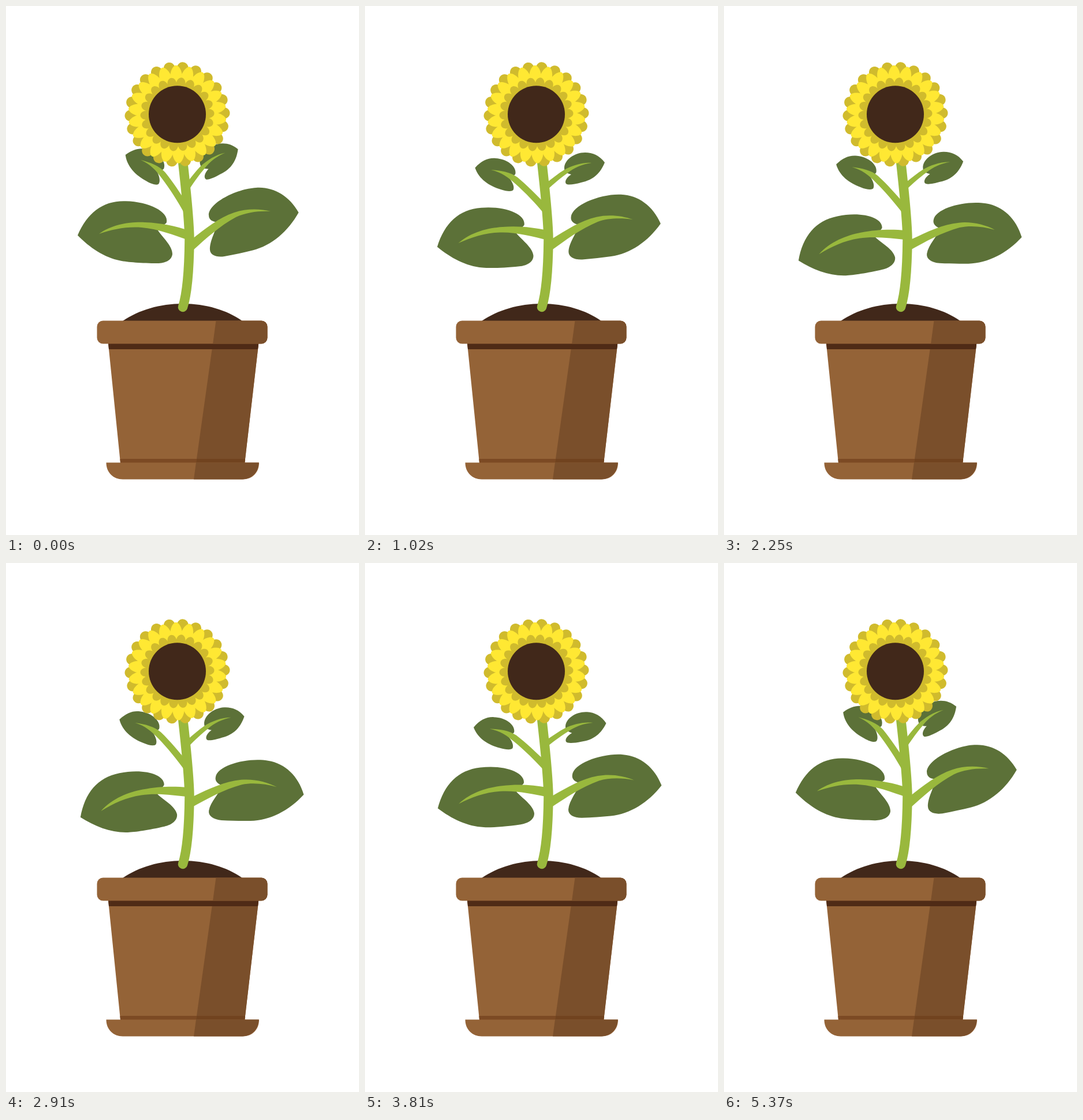
An HTML page with a canvas that plays this animation: 611 px wide and 917 px high, repeating every 5400 ms.

```html
<!DOCTYPE html>
<html lang="en">
<head>
<meta charset="utf-8">
<title>Sunflower</title>
<style>
html, body { margin: 0; width: 100%; height: 100%; overflow: hidden; background: #fff; }
canvas { display: block; }
</style>
</head>
<body>
<canvas id="stage" width="611" height="917"></canvas>
<script>
const ctx = document.getElementById('stage').getContext('2d');
const LOOP = 5400, STEP = 30, DEG = Math.PI / 180;
const C = {
  pot: '#946337', shade: '#7a4f2b', band: '#4f2b16', soil: '#41281a',
  leaf: '#5c7138', stem: '#99b83d', petal: '#ffe833', under: '#d0bb2d'
};

function fill(path, color) {
  ctx.fillStyle = color;
  ctx.fill(new Path2D(path));
}

// keys: [time, degrees] pairs; rest: angle at which the paths are drawn
const leaves = [
  {
    pivot: [315, 398], side: -1, rest: 0,
    keys: [[0, 0], [2550, 15], [LOOP, 0]],
    blade: 'M124 397.5C141 358 168 337 207 338.2C248 339 282 357 278 375C276 379 270 380 263 389C272 402 288 416 288 430C287 441 275 446 262 446C235 446 210 444 198 441.5C170 436 145 419 124 397.5Z',
    vein: 'M161 395C185 378 215 374 240 375C270 376 295 382 316 389V406C290 397 262 386 235 384C208 382 185 387 161 395Z'
  },
  {
    pivot: [324, 418], side: 1, rest: 0,
    keys: [[0, 0], [2580, 15], [LOOP, 0]],
    blade: 'M506.5 358C490 329 463 313 433 315C398 317 350 342 351 363C351 371 358 374 366 375C364 389 352 407 353 423C354 432 364 436 378 434C396 431 412 427 427 423.5C460 415 488 391 506.5 358Z',
    vein: 'M458 356C440 351 415 351 395 358C368 367 345 386 322 404L323 424C345 404 370 381 398 366C415 358 437 355 458 356Z'
  },
  {
    pivot: [313, 352], side: -1, rest: 11.2,
    keys: [[0, 0], [1330, 14.6], [2700, 5.3], [4000, 14.6], [LOOP, 0]],
    blade: 'M190.5 280.5C202 268 213 263 226 264C246 265 262 278 260.5 290C260 295 254 294 248 296C254 303 259 312 257 318C256 322 246 322 235 318C215 312 197 300 190.5 280.5Z',
    vein: 'M218 284C235 285 252 288 264 297C281 311 297 328 311 342V361C295 342 277 323 260 308C248 297 236 288 218 284Z'
  },
  {
    pivot: [316, 313], side: 1, rest: 14.4,
    keys: [[0, 0], [1425, 20], [2700, 9.5], [4040, 19.8], [LOOP, 0]],
    blade: 'M415 271.5C406 259 394 254 381 254C362 254 345 267 345 281C345 288 350 290 357 292C349 297 345 304 348 308C351 311 363 309 374 306C396 302 408 289 415 271.5Z',
    vein: 'M392 272C375 271 358 277 345 284C335 290 325 298 316 305V318C328 307 340 297 350 290C362 280 377 274 392 272Z'
  }
];

function angleAt(keys, t) {
  const i = keys.findIndex(k => k[0] > t);
  const [t0, a0] = keys[i - 1], [t1, a1] = keys[i];
  return a0 + (a1 - a0) * (t - t0) / (t1 - t0);
}

function drawLeaf(leaf, t) {
  const [x, y] = leaf.pivot;
  ctx.save();
  ctx.translate(x, y);
  ctx.rotate(leaf.side * (angleAt(leaf.keys, t) - leaf.rest) * DEG);
  ctx.translate(-x, -y);
  fill(leaf.blade, C.leaf);
  fill(leaf.vein, C.stem);
  ctx.restore();
}

function drawStem() {
  ctx.strokeStyle = C.stem;
  ctx.lineWidth = 16.5;
  ctx.lineCap = 'round';
  ctx.stroke(new Path2D('M304.5 255C308.5 295 317 360 317.5 405C317 455 313 500 306 522'));
}

// one ring of petals from radius r0 to r1; tip is the width near the outer end
function ring(r0, r1, half, tip, phase, color) {
  const count = 22, mid = r0 + (r1 - r0) * 0.5;
  ctx.fillStyle = color;
  for (let i = 0; i < count; i++) {
    ctx.save();
    ctx.rotate((phase + i * 360 / count) * DEG);
    ctx.beginPath();
    ctx.moveTo(0, -r0);
    ctx.bezierCurveTo(half * 1.3, -mid, tip, -r1, 0, -r1);
    ctx.bezierCurveTo(-tip, -r1, -half * 1.3, -mid, 0, -r0);
    ctx.fill();
    ctx.restore();
  }
}

function drawFlower() {
  ctx.save();
  ctx.translate(296.5, 187.8);
  ctx.fillStyle = C.under;
  ctx.beginPath();
  ctx.arc(0, 0, 68, 0, 7);
  ctx.fill();
  ring(40, 91, 12, 14, 6.6, C.under);
  ring(38, 85, 15, 7, -1.6, C.petal);
  ring(34, 64, 10, 8, 6.6, C.under);
  ctx.fillStyle = C.soil;
  ctx.beginPath();
  ctx.arc(0, 0, 49.5, 0, 7);
  ctx.fill();
  ctx.restore();
}

function drawPot() {
  fill('M202 546C230 527 266 516 306 516S382 527 409 546Z', C.soil);
  fill('M177 585H437.2L413.2 792H198Z', C.pot);
  fill('M358 585H437.2L413.2 792H329Z', C.shade);
  fill('M177 585H437.2L436 595H178Z', C.band);
  fill('M197.4 785H330L329 792H198Z', '#7c4a24');
  fill('M330 785H414L413.2 792H329Z', '#71431f');
  ctx.save();
  ctx.beginPath();
  ctx.roundRect(157.5, 545.5, 295, 40, 10.5);
  ctx.clip();
  fill('M157 545H453V586H157Z', C.pot);
  fill('M363.5 545H453V586H358Z', C.shade);
  ctx.restore();
  fill('M173.5 791.5H438C438 809 426 820.5 410 820.5H202C186 820.5 173.5 809 173.5 791.5Z', C.pot);
  fill('M329 791.5H437.5C437 808 425 820 409 820.5H325Z', C.shade);
}

function frame(now) {
  const t = Math.floor(now % LOOP / STEP) * STEP;
  ctx.fillStyle = '#fff';
  ctx.fillRect(0, 0, 611, 917);
  drawPot();
  leaves.forEach(leaf => drawLeaf(leaf, t));
  drawStem();
  drawFlower();
}

const start = performance.now();
function tick() {
  frame(performance.now() - start);
  requestAnimationFrame(tick);
}
tick();
</script>
</body>
</html>
```
